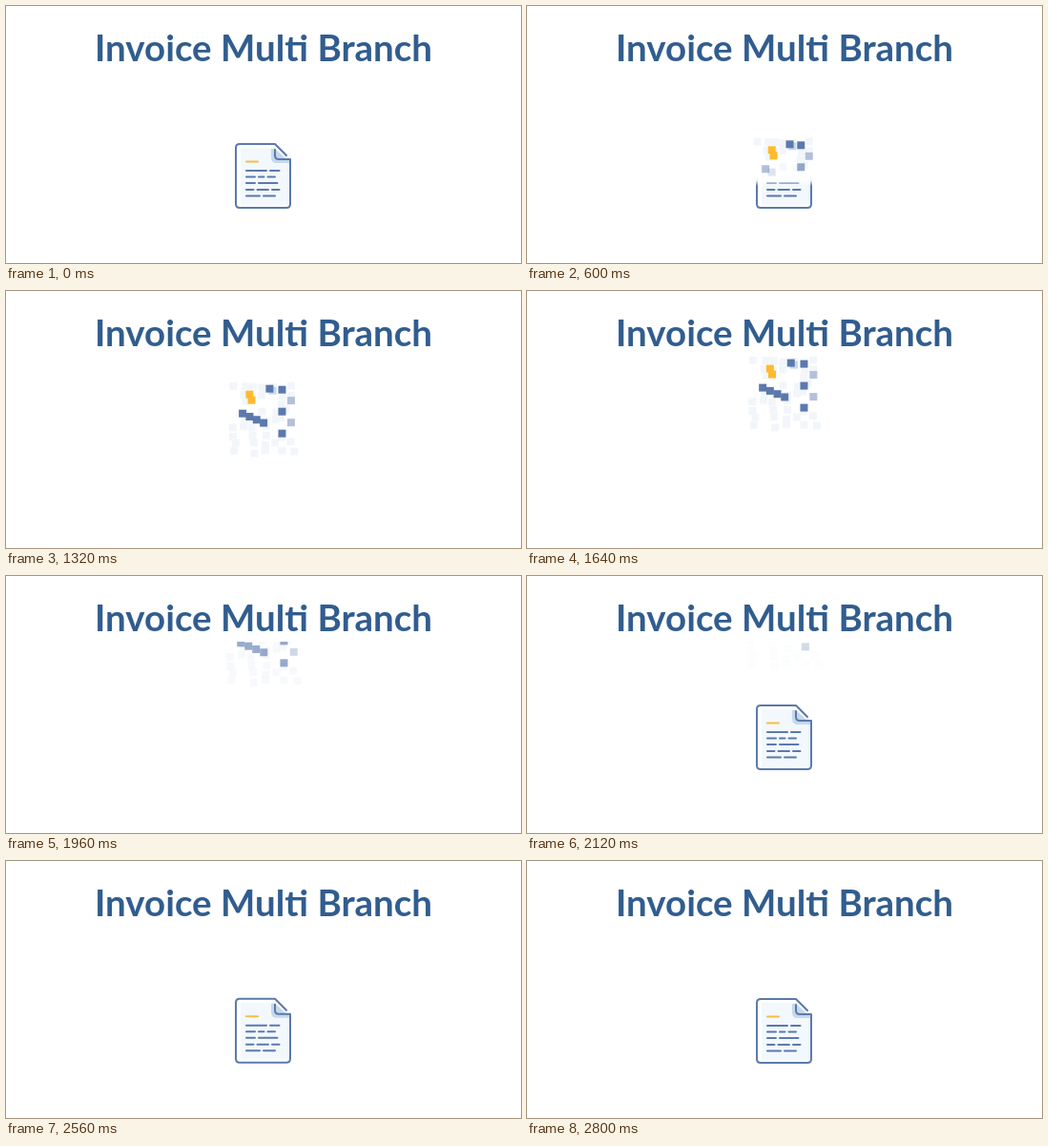
An HTML page with a canvas for the animation above (2.84 s loop, 540 by 270 pixels).

```html
<!DOCTYPE html>
<html lang="en">
<head>
<meta charset="utf-8">
<title>Invoice Multi Branch</title>
<style>
  html, body { margin: 0; width: 100%; height: 100%; overflow: hidden; background: #fff; }
  svg, canvas { position: absolute; left: 0; top: 0; display: block; }
  text { font: bold 38.5px Lato, sans-serif; fill: #315d8f; text-anchor: middle; }
</style>
</head>
<body>
<canvas id="stage" width="540" height="270"></canvas>
<svg width="540" height="270"><text x="270" y="58">Invoice Multi Branch</text></svg>
<script>
const LOOP = 2840, STEP = 40, TOP = 69;
const INK = '#5b79ad', MID = '#b3c1da', SKY = '#c5d9ea', PALE = '#f2f6fa', GOLD = '#fdbb2d';
const ctx = document.getElementById('stage').getContext('2d');
const clamp = v => Math.max(0, Math.min(1, v));

const paper = new Path2D('M282 145H241V212H298V161Z');
const shade = new Path2D('M282 149H246V209H298V161Z');
const flap = new Path2D('M278 150H282L294 161H298V165H284Q278 165 278 159Z');
const outline = new Path2D('M282 145H245Q241 145 241 149V208Q241 212 245 212H294Q298 212 298 208V161H286Q282 161 282 157V151M282 145L294 157');
const heading = new Path2D('M252 163.5h12');
const lines = new Path2D('M252 173h21m4 0h9.5M252 179.5h9m4 0h5.5m4 0h7.5M252 186h9m4 0h19.5M252 193h7.5m4 0h11.5m4 0h7.5M252 199.5h14m4 0h12');

function fill(path, color) {
  ctx.fillStyle = color;
  ctx.fill(path);
}

function stroke(path, color) {
  ctx.strokeStyle = color;
  ctx.stroke(path);
}

function drawSheet(dy) {
  ctx.save();
  ctx.translate(0, dy);
  ctx.lineCap = ctx.lineJoin = 'round';
  ctx.lineWidth = 2;
  fill(paper, '#fff');
  fill(shade, '#f3f8fc');
  fill(flap, SKY);
  stroke(outline, INK);
  stroke(heading, '#f5bd45');
  stroke(lines, INK);
  ctx.restore();
}

let seed = 11;
const random = () => (seed = seed * 16807 % 2147483647) / 2147483647;

// Scraps of paper, placed where they are after one second
function makeBits() {
  const bits = [];
  const add = (x, y, color) => bits.push({ x, y, color });
  for (let y = 123; y < 192; y += 8.5)
    for (let x = 240; x <= 300; x += 10)
      if (random() < .6) add(x + random() * 6 - 3, y + random() * 4 - 2, PALE);
  // Flap, right edge, text band and heading
  add(279, 127, SKY);
  add(276, 125, INK);
  for (let i = 0; i < 5; i++) add(i % 2 ? 297.5 : 288.5, 126 + i * 11.5, i % 2 ? MID : INK);
  for (let i = 0; i < 4; i++) add(249 + i * 7, 151 + i * 3.3, INK);
  add(256, 131, GOLD);
  add(258, 137, GOLD);
  return bits;
}
const bits = makeBits();

const lift = t => 3.55e-5 * t * t - 3.1e-9 * t ** 3;

function drawBits(t, front) {
  const rise = lift(t) - lift(1000), drift = (t - 1000) * 1.5e-4;
  const fade = clamp((2240 - t) / 450);
  ctx.save();
  ctx.beginPath();
  ctx.rect(0, TOP, 540, 270 - TOP);
  ctx.clip();
  for (const { x, y, color } of bits) {
    const px = x + (x - 268) * drift, py = y - rise;
    ctx.globalAlpha = fade * clamp((front - 12 - py) / 12);
    ctx.fillStyle = color;
    ctx.fillRect(px - 4, py - 4, 8, 8);
  }
  ctx.restore();
}

// Wipes the sheet from the top with a soft edge
function wipe(front) {
  const edge = ctx.createLinearGradient(0, front - 9, 0, front);
  edge.addColorStop(0, '#fff');
  edge.addColorStop(.4, 'rgba(255,255,255,.85)');
  edge.addColorStop(1, 'rgba(255,255,255,0)');
  ctx.fillStyle = edge;
  ctx.fillRect(230, TOP, 80, front - TOP);
}

// Damped spring that brings the sheet in from below
const spring = t => 128 * Math.exp(-t / 88) * Math.cos(Math.PI * t / 160);

function draw(t) {
  const front = 141 + .08 * t;
  ctx.clearRect(0, 0, 540, 270);
  if (t < 1120) {
    drawSheet(0);
    if (t >= STEP) wipe(front);
  }
  if (t >= STEP && t < 2240) drawBits(t, front);
  if (t > 2030) drawSheet(spring(t - 2030));
}

function tick() {
  const t = performance.now() % LOOP;
  draw(Math.floor(t / STEP) * STEP);
  requestAnimationFrame(tick);
}
tick();
</script>
</body>
</html>
```
